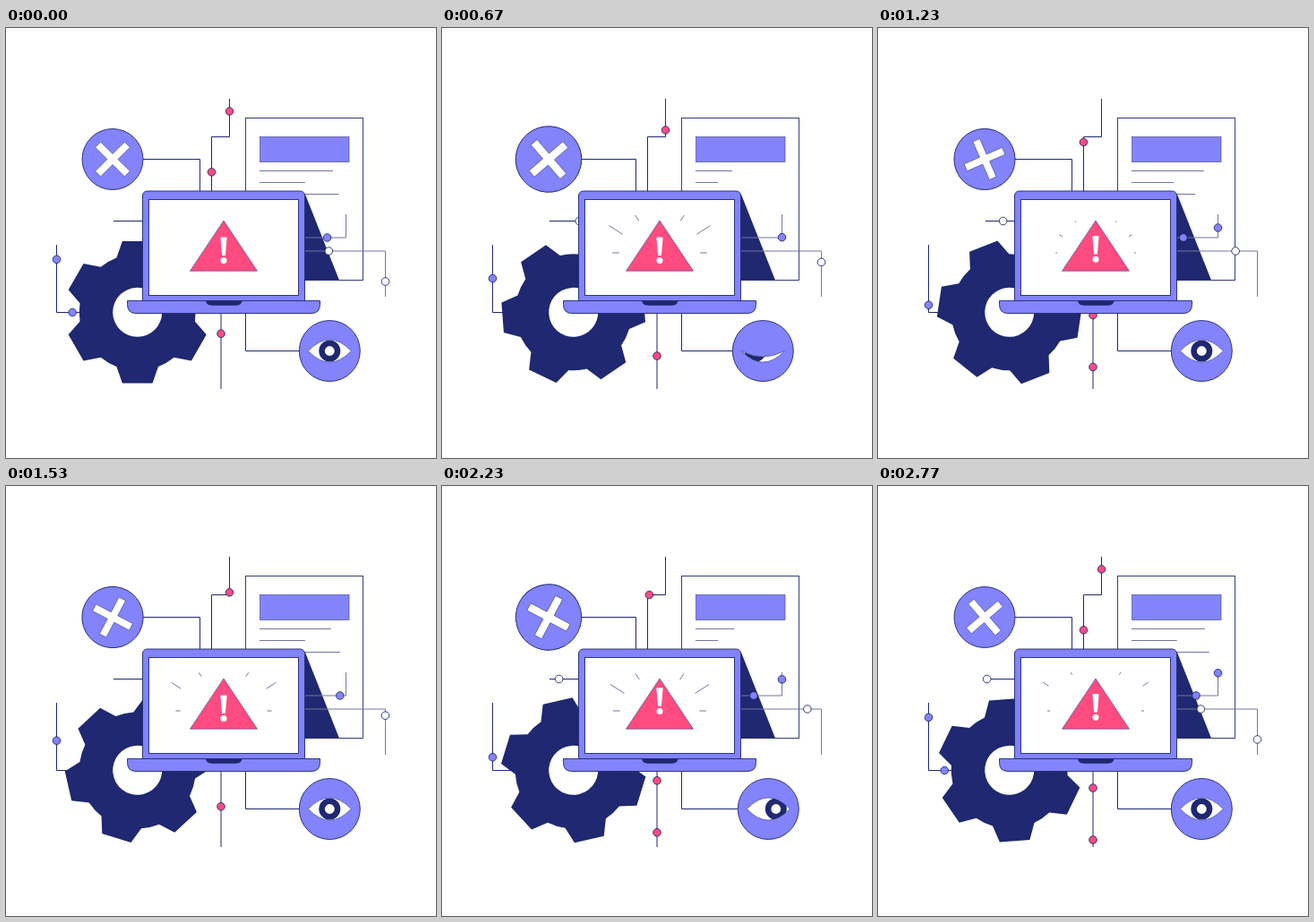
An HTML page that plays this animation: 480 px wide and 480 px high, repeating every 2800 ms.

```html
<!DOCTYPE html>
<html lang="en">
<head>
<meta charset="utf-8">
<title>System alert</title>
<style>
  html, body { margin: 0; width: 100%; height: 100%; overflow: hidden; background: #fff; }
  svg { display: block; width: 100vw; height: 100vh; }
  .line { fill: none; stroke: #1f2870; stroke-width: 1; }
  .soft { fill: none; stroke: #73779f; stroke-width: 1; }
  .edge { stroke: #1f2870; stroke-width: .9; }
  .thin { stroke: #4a4f98; stroke-width: .7; }
  .violet { fill: #8383fc; }
  .navy { fill: #1f2870; }
  .white { fill: #fff; }
  .pink { fill: #ff4b80; }
</style>
</head>
<body>
<svg viewBox="0 0 480 480">
  <defs><clipPath id="lids"><path id="lidShape"/></clipPath></defs>

  <!-- document -->
  <rect class="white edge" x="267.5" y="100.5" width="131" height="181"/>
  <rect class="violet thin" x="283.5" y="121.5" width="99.5" height="28"/>
  <g id="textLines"></g>
  <path class="navy" d="M333.5 184.5L372 281.5H333.5Z"/>

  <!-- wires -->
  <path class="line" d="M267.5 318V360.5H330"/>
  <path class="line" d="M150 146.5H216.5V183"/>
  <g id="wires"></g>
  <g id="dots"></g>

  <g id="gear"></g>

  <!-- laptop -->
  <rect class="violet edge" x="152.5" y="182" width="181" height="126" rx="5"/>
  <rect class="white edge" x="159.5" y="191.5" width="167" height="107"/>
  <path class="violet edge" d="M135.5 304.5H350.5V308.5Q350.5 318.5 341 318.5H145Q135.5 318.5 135.5 308.5Z"/>
  <path class="navy" d="M223 304.5H263.5Q262.5 309.7 257 309.7H229.5Q224 309.7 223 304.5Z"/>

  <!-- warning -->
  <g id="rays"></g>
  <path class="pink thin" d="M243 215L280.5 271.2H205.5Z"/>
  <g id="bang" class="white">
    <path d="M239.4 234.5Q239.4 233.5 240.4 233.5H245.6Q246.6 233.5 246.6 234.5L244.9 254H241.1Z"/>
    <circle cx="243" cy="259.6" r="3.5"/>
  </g>

  <!-- cross badge -->
  <g id="cross">
    <circle class="violet edge" r="36"/>
    <path class="white thin" d="M-4.5-24.5H4.5V-4.5H24.5V4.5H4.5V24.5H-4.5V4.5H-24.5V-4.5H-4.5Z"/>
  </g>

  <!-- eye badge -->
  <g id="eye">
    <circle class="violet edge" r="34"/>
    <path id="eyeball" class="white thin"/>
    <g clip-path="url(#lids)">
      <g id="pupil"><circle class="navy" r="12"/><circle class="white" r="5.4"/></g>
    </g>
  </g>
</svg>
<script>
const FRAMES = 84, LOOP = 2800;
const $ = id => document.getElementById(id);

function set(el, attrs) {
  for (const key in attrs) el.setAttribute(key, attrs[key]);
}
function add(parent, tag, attrs) {
  const el = document.createElementNS('http://www.w3.org/2000/svg', tag);
  set(el, attrs);
  return $(parent).appendChild(el);
}

const clamp = v => Math.min(1, Math.max(0, v));
const easeInOut = p => p < .5 ? 4 * p ** 3 : 1 - 4 * (1 - p) ** 3;

// Up to 1 and back to 0, twice per loop
function pulse(k, delay) {
  const u = (k - delay + FRAMES) % 42;
  return easeInOut(1 - Math.abs(u - 21) / 21);
}
// 1 between two moments, with a ramp at each end
const hold = (k, from, to) => clamp(Math.min(k - from, to - k) / 9);

// Gear with six teeth
function gearPath() {
  const point = (r, deg) => {
    const a = deg * Math.PI / 180;
    return `${r * Math.cos(a)} ${r * Math.sin(a)}`;
  };
  let d = '';
  for (let c = 30; c < 390; c += 60) {
    d += (d ? 'A65 65 0 0 1 ' : 'M') + point(65, c - 21);
    d += 'L' + point(81, c - 12) + 'L' + point(81, c + 12) + 'L' + point(65, c + 21);
  }
  return d + 'A65 65 0 0 1 ' + point(65, 9) + 'Z';
}
add('gear', 'path', { class: 'navy', d: gearPath() });
add('gear', 'circle', { class: 'white', r: 27.5 });

// Wires with dots running along them: distance = from + speed * age - drag * age²
const LONG = (FRAMES - 1) / 3, SHORT = 14;
const wires = [
  { d: 'M229.5 190V121.5H249.5V79', look: 'line', fill: 'pink', period: LONG, from: 28, speed: 3.8, drag: .022 },
  { d: 'M94 317.5H56.5V242', look: 'line', fill: 'violet', period: LONG, from: 19, speed: 2.78, drag: 0 },
  { d: 'M326 249H423.5V300', look: 'soft', fill: 'white', period: LONG, from: 33, speed: 4.5, drag: .035 },
  { d: 'M240 300V403', look: 'line', fill: 'pink', period: SHORT, from: -18, speed: 4.14, drag: 0 },
  { d: 'M326 234H379.5V208', look: 'soft', fill: 'violet', period: SHORT, from: -18.2, speed: 3.55, drag: 0 },
  { d: 'M160 215.5H120', look: 'line', fill: 'white', period: SHORT, from: -21.5, speed: 4.5, drag: 0 }
];
for (const wire of wires) {
  wire.path = add('wires', 'path', { class: wire.look, d: wire.d });
  wire.length = wire.path.getTotalLength();
  wire.dots = [-1, 0, 1].map(n => ({
    n, el: add('dots', 'circle', { class: wire.fill + ' edge', r: 4.3 })
  }));
}

const textLines = [
  { y: 159.5, right: 365, shrink: 41, delay: -1 },
  { y: 172.5, right: 334, shrink: 26, delay: 2 },
  { y: 185.5, right: 373, shrink: 60, delay: 4 }
];
for (const line of textLines) {
  line.el = add('textLines', 'line', { class: 'soft', x1: 283, y1: line.y, y2: line.y });
}

// Rays on the left, mirrored to the right
const rays = [];
for (const [x1, y1, x2, y2] of [[206, 233, 184, 219], [221, 217, 215, 208], [200, 251, 189, 251]]) {
  for (const side of [-1, 1]) {
    rays.push({
      x: 243 + side * (243 - x1), y: y1, dx: side * (x1 - x2), dy: y2 - y1,
      el: add('rays', 'line', { class: 'soft' })
    });
  }
}

function drawDots(k) {
  for (const { path, length, period, from, speed, drag, dots } of wires) {
    for (const { n, el } of dots) {
      const age = (k + .3) % period + n * period;
      const s = from + speed * age - drag * age * age;
      const shown = s >= 0 && s <= length;
      el.style.display = shown ? '' : 'none';
      if (shown) {
        const { x, y } = path.getPointAtLength(s);
        set(el, { cx: x, cy: y });
      }
    }
  }
}

function drawRays(k) {
  const p = k % 12 / 12, head = 1 - (1 - p) ** 2, tail = p ** 4;
  for (const { x, y, dx, dy, el } of rays) {
    set(el, { x1: x + dx * tail, y1: y + dy * tail, x2: x + dx * head, y2: y + dy * head });
    el.style.display = p ? '' : 'none';
  }
}

// Glance left with a slow blink, blink again, glance right
function drawEye(k) {
  const gaze = hold(k, 57, 81) - hold(k, 6, 37);
  const lid = -25 + 38 * (hold(k, 4, 37) + hold(k, 46, 64));
  const d = `M-24 0Q0 ${lid} 24 0Q0 25 -24 0Z`;
  set($('eye'), { transform: `translate(${361.3 + 3 * gaze} 360.5)` });
  set($('eyeball'), { d });
  set($('lidShape'), { d });
  set($('pupil'), { transform: `translate(${8.5 * gaze} 0)` });
}

function draw(k) {
  const turn = k * 360 / FRAMES;
  set($('gear'), { transform: `translate(146.7 317.3) rotate(${turn})` });

  const size = (34 + 2.8 * pulse(k, -1)) / 36;
  set($('cross'), { transform: `translate(119 146.5) rotate(${45 - turn}) scale(${size})` });

  for (const { right, shrink, delay, el } of textLines) set(el, { x2: right - shrink * pulse(k, delay) });

  const hop = Math.max(0, 1 - ((k % 14 - 11) / 2.2) ** 2);
  set($('bang'), { transform: `translate(0 ${-8.2 * hop})` });

  drawDots(k);
  drawRays(k);
  drawEye(k);
}

// The motion runs in steps of a thirtieth of a second.
const start = performance.now();
function tick() {
  const t = (performance.now() - start) % LOOP;
  draw(Math.floor((t + 5) * FRAMES / LOOP) % FRAMES);
  requestAnimationFrame(tick);
}
tick();
</script>
</body>
</html>
```
